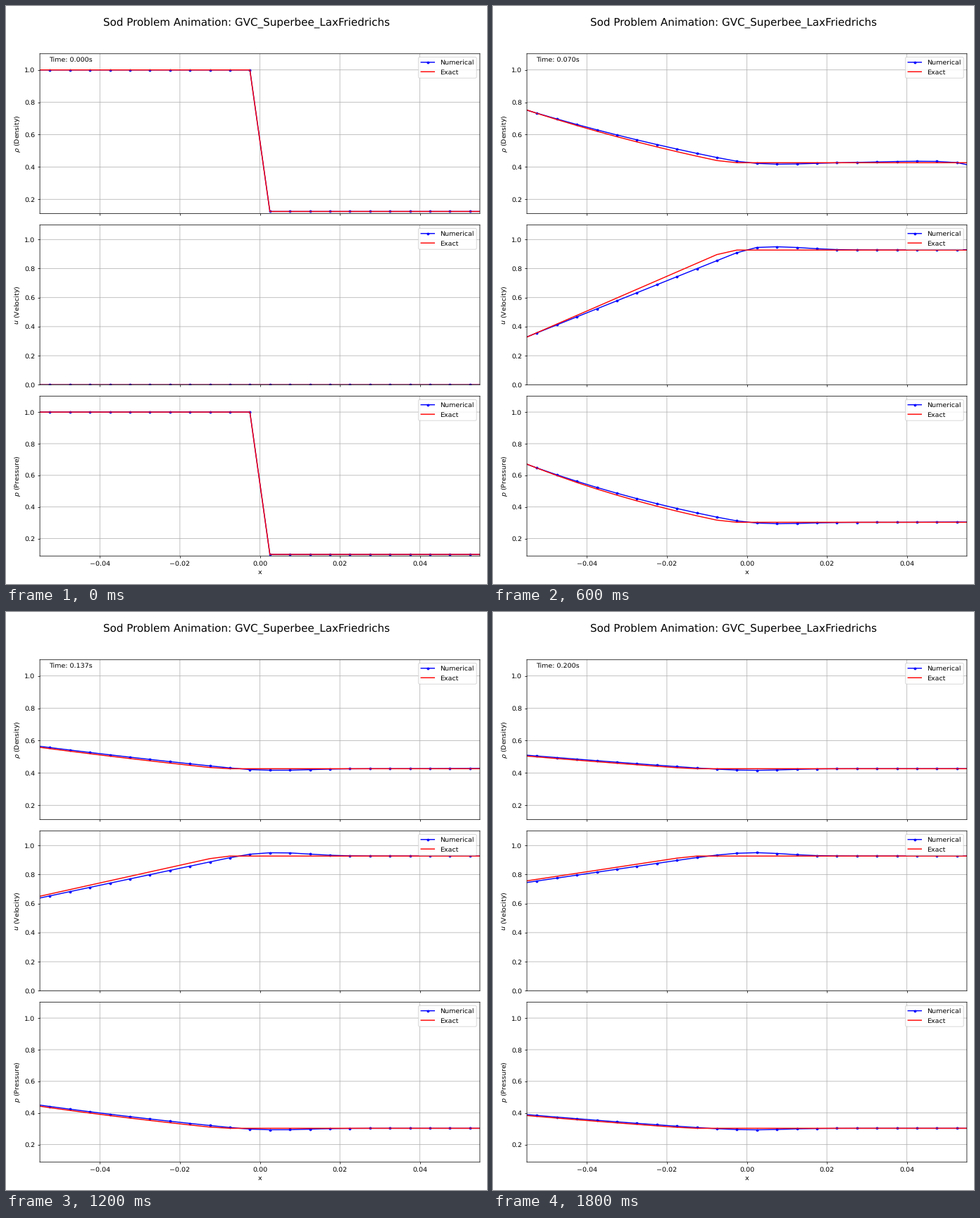
A matplotlib script that plays this animation: 683x820 px, repeating every 1.9 s.

```python
import numpy as np
import matplotlib.pyplot as plt
from matplotlib.animation import FuncAnimation

W, H, DPI = 683, 820, 68.3
FRAMES, INTERVAL = 19, 100

# soft, unsnapped strokes and natural glyph widths
plt.rcParams["path.snap"] = False
plt.rcParams["text.hinting"] = "none"

# Sod shock tube: left sound speed, star region, shock speed
C_L = np.sqrt(1.4)
U_S = 0.92745
RHO_SR = 0.26557
SHOCK = 1.75216

DX = 0.005
x = (np.arange(-13, 13) + 0.5) * DX


def time_at(k):
    if k == 0:
        return 0.0
    return min(0.0026 + 0.01118 * k, 0.2)


def gauss(center, sigma):
    return np.exp(-0.5 * ((x - center) / sigma) ** 2)


def softmin(a, b, w):
    return -w * np.logaddexp(-a / w, -b / w)


def isentropic(u):
    """Density and pressure on the left-running simple wave."""
    base = 1 - 0.2 * u / C_L
    return base ** 5, base ** 7


def exact(t):
    if t == 0:
        left = x < 0
        return np.where(left, 1, 0.125), 0 * x, np.where(left, 1, 0.1)
    s = x / t
    fan = np.clip((C_L + s) / 1.2, 0, U_S)
    rho, p = isentropic(fan)
    rho = np.where(s > U_S, RHO_SR, rho)
    ahead = s > SHOCK
    return (np.where(ahead, 0.125, rho),
            np.where(ahead, 0, fan),
            np.where(ahead, 0.1, p))


def shock_front(t, shift, width=0.0018):
    z = (x - SHOCK * t - shift) / width
    return 1 / (1 + np.exp(np.clip(z + 0.012 * z ** 3, -60, 60)))


def numerical(t):
    """Smeared solution: late fan, overshoot behind its tail, soft fronts."""
    if t == 0:
        return exact(0)

    contact = U_S * t
    age = max(t - 0.025, 0)

    fan = (C_L + (x - 0.0044) / (t + 0.0057)) / 1.2
    fan = 0.033 * np.logaddexp(0, fan / 0.033)
    over = 0.0235 * (1 - np.exp(-t / 0.02))
    cap = U_S + over * gauss(0.0098 - 0.04 * t, 0.0078)
    u_left = softmin(fan, cap, 0.006 + 0.07 * np.exp(-t / 0.023))
    rho, p = isentropic(u_left)

    # start-up error around the diaphragm
    start = 0.03 * np.exp(-t / 0.03) * gauss(0.002, 0.003)
    # right-running wave between contact and shock
    wave = 0.021 * np.exp(-age / 0.022)
    wave = wave * gauss(min(1.2 * t, 0.0175 + 0.5 * t), 0.006)

    u = (u_left + wave) * shock_front(t, 0.0002)

    trough = 0.008 * np.exp(-age / 0.01) * gauss(0.6 * contact, 0.005)
    p = p + start + 0.55 * wave - trough
    p = 0.1 + (p - 0.1) * shock_front(t, -0.0006)

    half = min(t, 0.015 + 0.03 * np.exp(-t / 0.0131))
    f = np.clip(0.5 - (x - contact) / (2 * half), 0, 1)
    f = f * f * (3 - 2 * f)
    late = max(t - 0.047, 0)
    bump = 0.009 * (1 - np.exp(-(t / 0.025) ** 3))
    bump = bump * gauss(contact - 0.016 - 0.25 * late, 0.006 + 0.15 * late)
    dip = 0.014 * np.exp(-age / 0.015)
    dip = dip * gauss(contact + min(0.42 * t, 0.0105), 0.006)
    rho = RHO_SR + (rho + 1.2 * start - RHO_SR) * f + bump - dip
    rho = 0.125 + (rho - 0.125) * shock_front(t, -0.0013, 0.002)
    return rho, u, p


fig = plt.figure(figsize=((W + 0.001) / DPI, (H + 0.001) / DPI), dpi=DPI)
fig.suptitle("Sod Problem Animation: GVC_Superbee_LaxFriedrichs",
             fontsize=16, y=0.981)

PANELS = [
    (r"$\rho$ (Density)", 0.1125),
    (r"$u$ (Velocity)", 0.0),
    (r"$p$ (Pressure)", 0.09),
]
LEFT, WIDTH = 48.1, 624.8
TOP, PITCH, HEIGHT = 67.75, 242.95, 226.6

axes, num_lines, exact_lines = [], [], []
for row, (label, low) in enumerate(PANELS):
    bottom = TOP + row * PITCH + HEIGHT
    ax = fig.add_axes([LEFT / W, 1 - bottom / H, WIDTH / W, HEIGHT / H])
    num_lines += ax.plot(x, 0 * x, "b.-", label="Numerical")
    exact_lines += ax.plot(x, 0 * x, "r-", label="Exact")
    ax.set_xlim(-0.055, 0.055)
    ax.set_ylim(low, 1.1)
    ax.set_ylabel(label)
    ax.grid(True)
    ax.legend(loc="upper right")
    axes.append(ax)

for ax in axes[:-1]:
    ax.tick_params(labelbottom=False)
axes[-1].set_xlabel("x")
clock = axes[0].text(0.02, 0.95, "", transform=axes[0].transAxes)


def update(k):
    t = time_at(k)
    for line, y in zip(num_lines, numerical(t)):
        line.set_ydata(y)
    for line, y in zip(exact_lines, exact(t)):
        line.set_ydata(y)
    clock.set_text(f"Time: {t:.3f}s")
    return [*num_lines, *exact_lines, clock]


anim = FuncAnimation(fig, update, frames=FRAMES, interval=INTERVAL, repeat=True)
plt.show()
```
